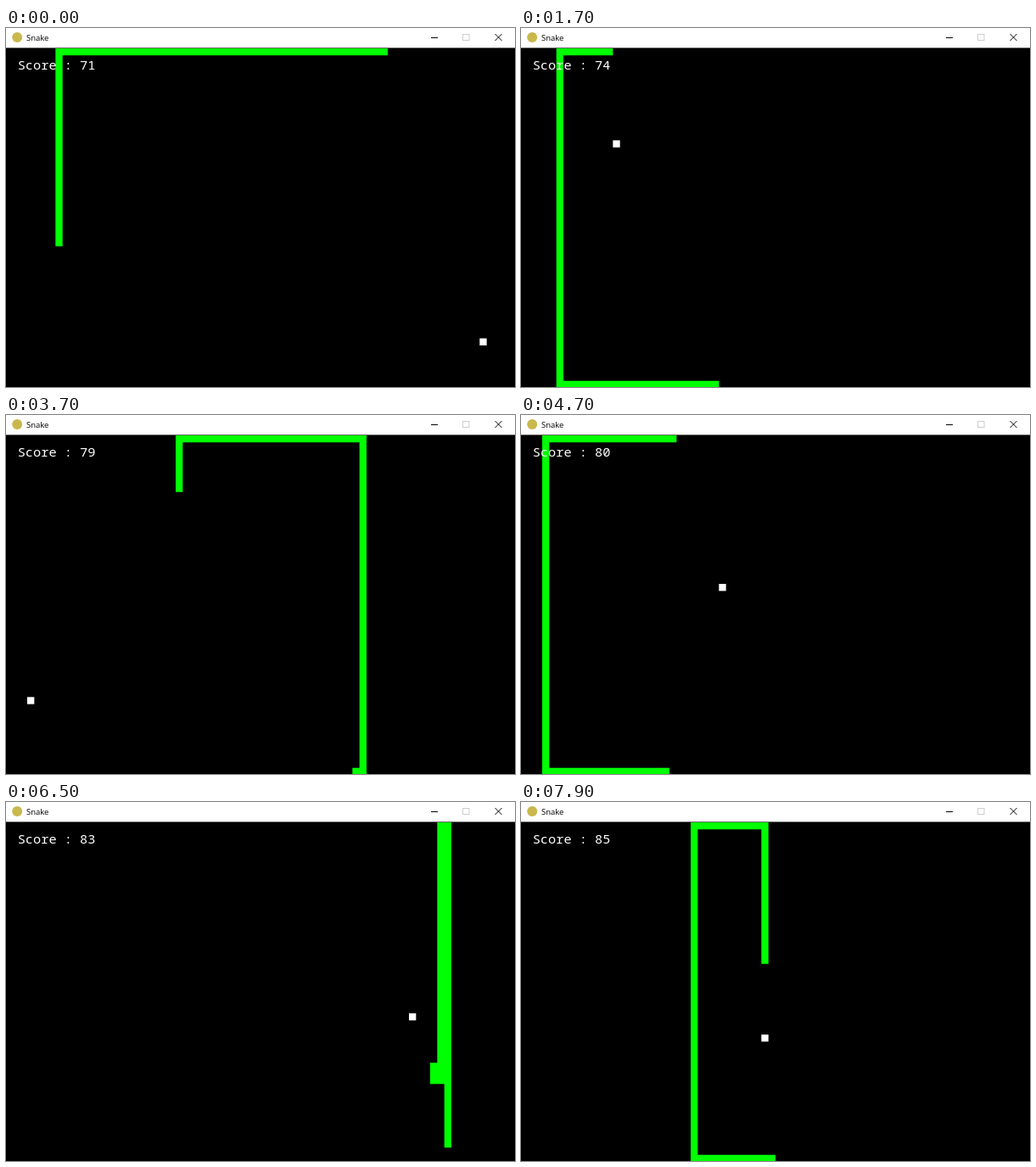
Recreate the animation shown at these times as an HTML page. Size 600x423 px, loop 8000 ms.

```html
<!DOCTYPE html>
<html lang="en">
<head>
<meta charset="utf-8">
<title>Snake</title>
<style>
  html, body { margin: 0; width: 100%; height: 100%; overflow: hidden; background: #000; }
  svg { display: block; width: 100%; height: 100%; }
  .title { font: 9.5px "Open Sans", "Noto Sans", sans-serif; }
  .score { font: 500 15.3px "Noto Sans Mono", "DejaVu Sans Mono", monospace; fill: #fff; white-space: pre; }
</style>
</head>
<body>
<svg viewBox="0 0 600 423">
  <rect width="600" height="423"/>
  <g transform="translate(0 24) scale(8.33333)">
    <rect id="food" width="1" height="1" fill="#fff"/>
    <polyline id="snake" fill="none" stroke="#0f0" stroke-width="1" stroke-linecap="square"/>
  </g>
  <text id="score" class="score" x="13.7" y="49"></text>
  <rect width="600" height="23.4" fill="#fff"/>
  <circle cx="13.2" cy="11" r="6" fill="#c9b84c"/>
  <text class="title" x="24" y="14.8">Snake</text>
  <g fill="none" stroke="#000">
    <path d="M501 11.5h8"/>
    <rect x="538.5" y="7.5" width="7.5" height="7" stroke="#ccc"/>
    <path d="M576.5 7l8 8m0-8l-8 8"/>
  </g>
</svg>
<script>
const LOOP = 8000, TICK = 100, CELL_TIME = 9;
const BOTTOM = 47, START_SCORE = 71, START_LENGTH = 74;

// Food cells in the order they appear; the route follows from them.
const foods = '67,41 47,41 5,20 13,13 32,12 32,31 24,18 50,20 3,37 28,21 60,36 62,20 57,27 24,22 34,30'
  .split(' ').map(pair => pair.split(',').map(Number));

const route = [[7, 27]];

function moveTo(tx, ty) {
  let [x, y] = route[route.length - 1];
  while (x !== tx || y !== ty) {
    x += Math.sign(tx - x);
    y += Math.sign(ty - y);
    route.push([x, y]);
  }
}

// Food to the right is reached along the top edge, food to the left along the bottom.
// If the snake faces away from that edge, it first sidesteps one column.
let goingDown = false;
const eatenAt = foods.map(([fx, fy]) => {
  const [x, y] = route[route.length - 1];
  const side = Math.sign(fx - x);
  if (side) {
    const viaBottom = side < 0;
    const edge = viaBottom ? BOTTOM : 0;
    const lane = goingDown === viaBottom ? x : x + side;
    moveTo(lane, y);
    moveTo(lane, edge);
    moveTo(fx, edge);
    goingDown = !viaBottom;
  }
  moveTo(fx, fy);
  return route.length - 1;
});

const [snake, food, score] = ['snake', 'food', 'score'].map(id => document.getElementById(id));

function draw(time) {
  const shown = Math.floor(time % LOOP / TICK) * TICK;
  const head = START_LENGTH - 1 + Math.round(shown / CELL_TIME);
  const eaten = eatenAt.filter(at => at <= head).length;
  const body = route.slice(head + 1 - START_LENGTH - eaten, head + 1);
  const [fx, fy] = foods[eaten];
  snake.setAttribute('points', body.map(([x, y]) => `${x + 0.5},${y + 0.5}`).join(' '));
  food.setAttribute('x', fx);
  food.setAttribute('y', fy);
  score.textContent = `Score : ${START_SCORE + eaten}`;
}

const began = performance.now();
function frame() {
  draw(performance.now() - began);
  requestAnimationFrame(frame);
}
frame();
</script>
</body>
</html>
```
